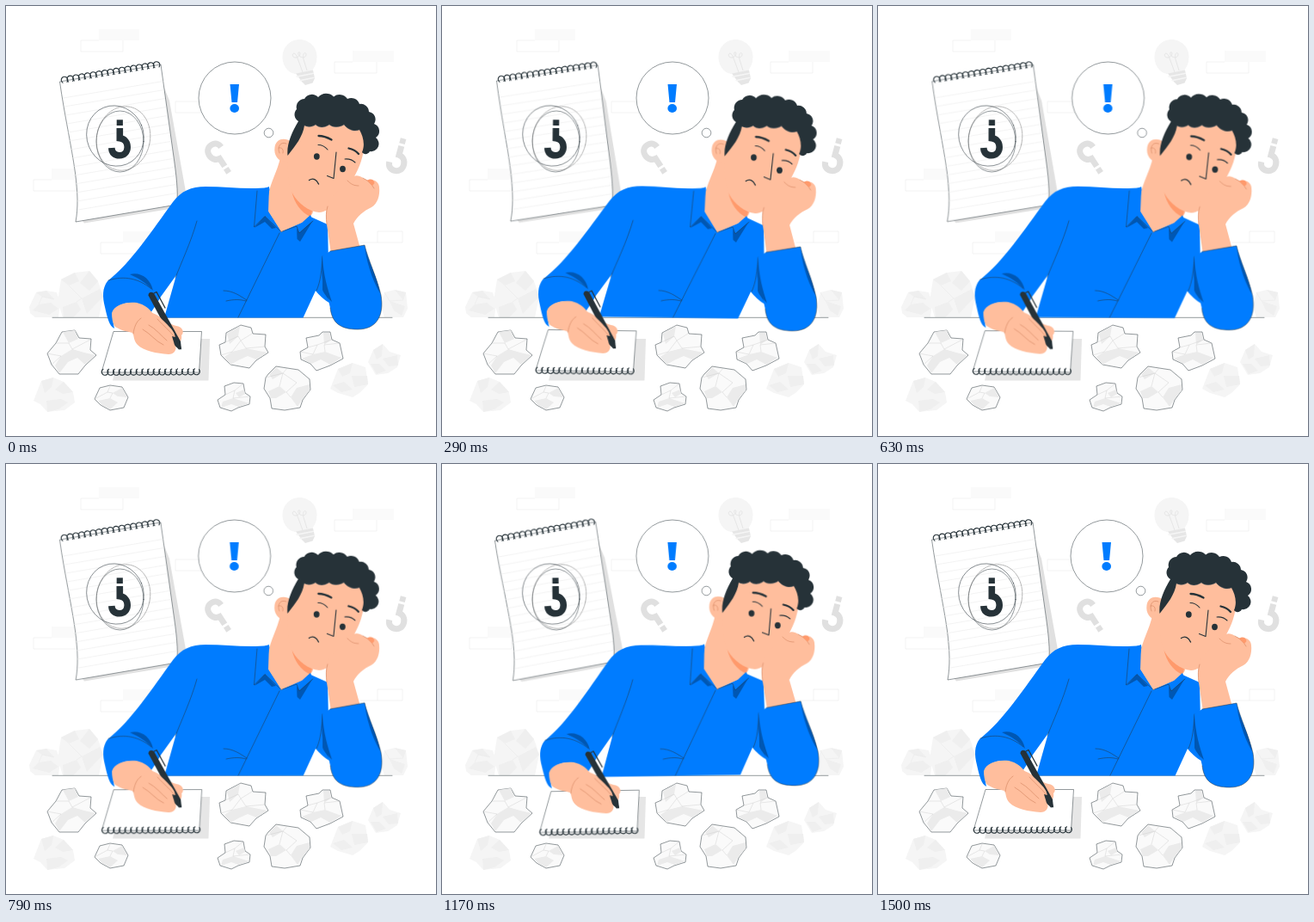
An HTML page that plays this animation: 500 px wide and 500 px high, repeating every 1.54 s.

```html
<!DOCTYPE html>
<html lang="en">
<head>
<meta charset="utf-8">
<title>Thinking writer</title>
<style>
html, body { margin: 0; width: 100%; height: 100%; overflow: hidden; background: #fff; }
svg { display: block; width: 100vw; height: 100vh; }
.sway { animation: wind 1.54s linear infinite; }
#pad { transform-origin: 135px 159px; }
#man { transform-origin: 274.5px 265px; }
#bubble { animation: shake 1.54s ease infinite; }
/* 1.5 s of motion, then a short rest */
@keyframes wind {
  0%, 97.4%, 100% { transform: rotate(0deg); }
  24.35% { transform: rotate(1deg); }
  73.05% { transform: rotate(-1deg); }
}
@keyframes shake {
  0%, 97.4%, 100% { transform: translateX(0); }
  9.74%, 87.66% { transform: translateX(-1px); }
  19.48%, 77.92% { transform: translateX(2px); }
  29.22%, 48.7%, 68.18% { transform: translateX(-4px); }
  38.96%, 58.44% { transform: translateX(4px); }
}
.brick { fill: #fafafa; }
.frame { fill: none; stroke: #ebebeb; stroke-width: .6; }
.pale { fill: #f5f5f5; }
.pale2 { fill: #efefef; }
.grey { fill: #e0e0e0; }
.soft { fill: #e6e6e6; }
.mark { fill: none; stroke: #e0e0e0; }
.paper { fill: #fafafa; stroke: #263238; stroke-width: .5; stroke-linejoin: round; }
.shade { fill: #ebebeb; }
.fold { fill: none; stroke: #c8c8c8; stroke-width: .4; }
.thin { fill: none; stroke: #263238; stroke-width: .5; stroke-linecap: round; }
.page { fill: #fff; stroke: #263238; stroke-width: .5; stroke-linejoin: round; }
.rule { fill: none; stroke: #ebebeb; stroke-width: .6; }
.coil { fill: none; stroke: #263238; stroke-width: 1.1; stroke-linecap: round; }
.skin { fill: #ffbe9d; }
.blush { fill: #ff9a6c; }
.crease { fill: none; stroke: #d98b68; stroke-width: .7; stroke-linecap: round; }
.blue { fill: #007cff; }
.navy { fill: #0057b3; }
.dark { fill: #263238; }
.ink { fill: none; stroke: #263238; stroke-linecap: round; stroke-linejoin: round; }
</style>
</head>
<body>
<svg viewBox="0 0 500 500" preserveAspectRatio="none">
  <defs>
    <g id="query">
      <path d="M132.300 142V153.600C137.600 154.200 141.200 158.400 141.200 164C141.200 170 137.300 173.800 131.800 173.800C126.300 173.800 123 170.600 122.800 165" stroke-width="7.600"/>
      <path d="M132.300 132.300V139" stroke-width="7.200"/>
    </g>
  </defs>

  <!-- wall -->
  <path class="brick" d="M108 27h47v13h-47zM403 52h48v13h-48zM53 189h48v13h-48zM136 262h48v13h-48z"/>
  <path class="frame" d="M108 40H87V53H136V40M403 65H382V78H431V65M197 111H246V124H197zM53 202H32V215H81V202M136 275H110V288H159V275M432 275V262H461V275H412"/>

  <!-- bulb and question marks -->
  <path class="pale" d="M338 79C328 79 321.500 69 321.500 59.500C321.500 47.500 330.500 39 341.500 39C352.500 39 361.500 48 361.500 59C361.500 66 359 71 356 75Z"/>
  <path class="mark" style="stroke:#e6e6e6" d="M345 77L338 58C334 51 331 59 336 60C343 60 343 52 340 54C338 58 347 63 349 57C349 52 344 55 346 62L350 75"/>
  <path class="soft" d="M337 78.500L357 74.500L359 84L356.500 89.500L348 92L344 88Z"/>
  <path class="pale" d="M337 81.500L358 77.500V79L338 83ZM341 86L358.500 82.500V84L342 87.500Z"/>
  <use href="#query" class="mark" transform="translate(248.500 177) rotate(147) scale(.92) translate(-132 -154)"/>
  <use href="#query" class="mark" transform="translate(456.500 174) rotate(15) scale(.93) translate(-132 -154.500)"/>

  <!-- faint paper balls behind the desk -->
  <path class="pale" d="M27 350L35 333L47 331L59 333L63 346L61 362H34L28 357ZM60 343L64 318L80 310L97 308L107 320L113 338L108 362H66ZM436 350L440 333L452 330L465 333L467 352L462 362H440Z"/>
  <path class="pale2" d="M35 333L47 331L56 341L42 338ZM38 347L52 345L61 352L50 359L31 354ZM64 318L80 310L85 320L73 325ZM97 308L107 320L97 331L86 322ZM88 340L109 329L113 338L102 349L94 358ZM66 350L82 344L87 353L78 362H67ZM452 330L465 333L462 342ZM446 343L464 349L460 360L451 354Z"/>
  <path class="fold" style="stroke:#e3e3e3" d="M73 325L88 340L82 344M38 347L42 338L56 341M440 333L446 343L462 342"/>

  <path class="thin" d="M54 362.300H449"/>

  <!-- faint balls on the desk -->
  <path class="pale" d="M32 459L41 436L55 432L67 437L78 449L80 461L68 470L48 472L40 463ZM377 445L386 422L403 415L418 420L421 440L411 450L403 455L386 450ZM421 414L427 400L438 393L446 402L459 406L455 420L444 427L430 429Z"/>
  <path class="pale2" d="M41 436L55 432L53 443L45 450ZM57 446L67 437L78 449L66 451ZM47 459L64 457L72 461L61 469L48 472ZM386 422L403 415L400 427L391 431ZM402 430L420 430L421 440L405 443ZM380 441L393 437L403 446L390 449ZM427 400L438 393L437 407L431 411ZM438 410L455 406L456 418L445 419ZM424 416L434 416L442 424L431 428Z"/>

  <!-- paper balls -->
  <g>
    <path class="paper" d="M65 379L80 377L85 386L99 387L98 400L105 406L92 418L84 428L62 428L53 417L48 404L58 392Z"/>
    <path class="shade" d="M66 379L73 392L84 387L80 377ZM64 407L77 399L91 403L104 406L92 417L83 409L72 414L62 427L57 418Z"/>
    <path class="fold" d="M58 392L73 392L77 399M48 404L64 407M77 399L98 388M53 417L64 407"/>
  </g>
  <g>
    <path class="paper" d="M256 380L273 371L285 374L287 381L302 382L301 396L305 403L291 412L283 421L261 417L250 406L248 394L255 391Z"/>
    <path class="shade" d="M257 381L272 372L270 384L260 393ZM263 402L279 398L304 403L291 411L281 407L270 412L261 417L254 408Z"/>
    <path class="fold" d="M255 391L270 384L273 389L279 398L301 396M250 406L263 402L273 389L286 381"/>
  </g>
  <g>
    <path class="paper" d="M349 386L364 383L368 379L377 379L379 388L388 392L392 410L377 418L361 424L354 416L343 411L342 402L351 397Z"/>
    <path class="shade" d="M369 380L376 380L378 388L370 394ZM357 405L371 402L390 409L377 417L366 411L355 416L344 410Z"/>
    <path class="fold" d="M351 397L362 394L379 388M342 402L357 405L362 394M371 402L370 394L388 392"/>
  </g>
  <g>
    <path class="paper" d="M109 444L121 441L135 443L142 455L137 467L121 470L110 464L103 457Z"/>
    <path class="shade" d="M124 450L135 444L141 455L130 454ZM107 459L121 456L130 461L121 469L112 464Z"/>
    <path class="fold" d="M103 457L118 449L124 450L121 456M118 449L121 442"/>
  </g>
  <g>
    <path class="paper" d="M254 442L265 438L276 439L278 450L284 454L283 463L270 467L262 471L249 467L246 458L255 452Z"/>
    <path class="shade" d="M267 450L277 446L278 451L271 455ZM252 460L264 456L283 462L270 466L262 463L250 467Z"/>
    <path class="fold" d="M255 452L266 447L264 456L284 454M276 439L266 447"/>
  </g>
  <g>
    <path class="paper" d="M305 428L314 419L327 421L340 423L353 434L354 446L345 458L342 467L324 470L309 468L307 456L300 445L302 432Z"/>
    <path class="shade" d="M306 428L314 420L322 427L310 434ZM305 448L318 442L326 449L314 456L308 456ZM338 444L353 440L353 447L344 458L339 466L331 455Z"/>
    <path class="fold" d="M302 432L322 427L338 438L326 449L331 455M327 421L322 427L318 442"/>
  </g>

  <!-- wall pad -->
  <g id="pad" class="sway">
    <path class="grey" d="M182 90L190 110L209 216L208 233L91 252.500L85 245Z"/>
    <path class="page" d="M62.500 88C68 127 76 162 80.500 194C83.500 217 84 235 81 251L198.500 231C200.500 217 198 196 194.500 172L180 68Z"/>
    <path class="rule" id="rules"/>
    <path class="coil" id="topcoil"/>
    <g class="thin">
      <ellipse cx="127" cy="151" rx="33" ry="35.500" transform="rotate(-22 127 151)"/>
      <ellipse cx="132.500" cy="157.500" rx="27.500" ry="35.500"/>
      <ellipse cx="136.500" cy="154" rx="31" ry="37.500" transform="rotate(12 136.500 154)" stroke="#777" stroke-dasharray="5 1"/>
    </g>
    <use href="#query" fill="none" stroke="#263238"/>
  </g>

  <path class="soft" d="M226 387H237L235.500 435.500H124L126 427Z"/>

  <!-- speech bubble -->
  <g id="bubble">
    <circle class="page" cx="266" cy="107" r="42"/>
    <circle class="page" cx="305.500" cy="147.500" r="5.300"/>
    <path class="blue" d="M260.500 91H271L269 112H262.500Z"/>
    <ellipse class="blue" cx="265.700" cy="119" rx="5.300" ry="4.900"/>
  </g>

  <g id="man" class="sway">
    <!-- notebook -->
    <path class="page" d="M125 378.500H227.500L224.500 426H111Z"/>
    <path class="coil" id="deskcoil"/>

    <!-- body and writing arm -->
    <path class="blue" d="M232 210C258 210 280 214 306 211L320 262L354 245L374 254L376 345C370 342 364 336 360 331L345.500 362.500H184L198 313L180 338C176 345 173 350 168 357C160 347 150 343 138 346C126 349 122 358 126 375C120 372 118 363 115 350C112 338 112 328 118 320C145 299 170 261 194 228C204 215 215 210 232 210Z"/>
    <path class="navy" d="M144 312C157 309 168 317 171 331C163 322 155 317 144 312ZM368 291C372 312 376 326 380 343L375 342C368 330 366 312 368 291Z"/>
    <path class="thin" d="M222 250C215 275 203 300 197 316M119 319C138 313 155 317 169 329M318 264L270 362M253 331C264 331 272 337 280 342M256 343C265 341 272 341 279 343M361 331C366 320 367 307 368 291"/>

    <!-- neck and collar -->
    <path class="skin" d="M319 176C316 192 307 205 305 221V239L320 263L345 252L356 242L370 205L335 170Z"/>
    <path class="blush" d="M332.500 216C337 227 347 233 356 238L354 245C343 240 335 229 332.500 216Z"/>
    <path class="blue" d="M306 210L292 215L288.500 257L301 244.500L320 262.500L305 239ZM320 262.500L344 252L354 243L357 250L341 264L339.500 271L337.500 262Z"/>
    <path class="navy" d="M288.500 258L301 244.500L314 258L309 259L301 251ZM338 258L341 264L356.500 250L342 274L338.500 271Z"/>
    <path class="thin" d="M292 215L288.500 257L301 244.500L320 262.500L338 256L341 264L357 250"/>

    <!-- head -->
    <path class="skin" d="M332 158C324 152 314 154 312.500 164C311 174 317 182 327 181C328 195 328 207 333 217C340 230 352 239 364 240C378 239 394 222 404 200C411 188 416 175 417 158C417 139 398 130 374 130C350 130 338 142 332 158Z"/>
    <path class="crease" d="M326 160C319 157 315 164 318 171M317 165C321 164 323 167 322 171"/>
    <path class="dark" d="M327.500 174C326 162 332 147 340 134A9 9 0 0 1 338 120A9.500 9.500 0 0 1 347 108A10 10 0 0 1 363 106A12 12 0 0 1 381 105.500A11 11 0 0 1 397 108A10 10 0 0 1 411 114A9.500 9.500 0 0 1 422 123A9 9 0 0 1 428 137A9 9 0 0 1 430 153A9 9 0 0 1 423 169C421 173 416 173 414 170C418 161 415 151 411 144C404 147 397 143 393 138C387 142 379 141 376 138C370 142 364 142 360 138C356 141 350 141 347 139C345 152 337 162 327.500 174Z"/>
    <path class="ink" style="stroke:#65727a" stroke-width=".4" d="M347 139C356 142 359 139 360 138M376 138C370 142 364 142 360 138M393 138C387 142 379 141 376 138M411 144C404 147 397 143 393 138"/>
    <path class="ink" stroke-width="2.300" d="M363.500 151C369 151 374 153 378.500 155.500M398.500 165.500C403 166.500 407 168.500 410 172"/>
    <ellipse class="dark" cx="361.300" cy="175" rx="3.400" ry="3.700"/>
    <ellipse class="dark" cx="391.500" cy="189.500" rx="3.400" ry="3.700"/>
    <path class="ink" stroke-width="1.100" d="M363 161.500C367 161.500 371 163.500 374 167M394 178C399 177.500 403 179 406 182M384 170L381 200.500L373.500 197.500"/>
    <path class="ink" stroke-width="1.400" d="M352.500 202.500C357 199.500 361 201.500 363.500 207"/>

    <!-- propping arm -->
    <path class="skin" d="M378 288L373 254C371 243 372 229 379 221C387 214 393 210 397 203C402 197 409 195 415 200C419 202 421 203 424 202C430 202 434 206 434 211C435 220 432 230 425 234C416 238 408 245 404 253L412 282Z"/>
    <path class="crease" d="M397 203C401 207 404 209 410 209M415 200C421 203 425 207 428 212M373 254C372 246 372 239 374 233"/>
    <path class="blush" d="M420 203C424 200 428 202 428.500 206L426 209Z"/>
    <path class="blue" d="M377 285L417 278C421 295 431 315 436 336C440 360 431 376 409 376C388 376 379 368 377 351C373 333 367 315 368 291Z"/>
    <path class="navy" d="M368 291C369 313 374 329 379 344C376 341 370 336 368 330ZM417 281C422 299 432 316 435 334C429 324 421 306 417 281Z"/>
    <path class="thin" d="M377 285L417 278C421 295 431 315 436 336C440 360 431 376 409 376C388 376 379 368 377 351"/>

    <!-- writing hand -->
    <path class="skin" d="M123 357C126 347 140 343.500 152 345C161 347 167 352 171 358C182 362 189 370 198 372C205 373 208 379 204 383C205 388 202 393 197 395C199 400 195 405 189 405C175 404 160 401 153 394C148 389 149 382 147 380C139 378 132 377 126 372C124 368 123 363 123 357Z"/>
    <path class="ink" stroke-width="1.300" d="M172 334L175 332.500L185 351"/>
    <path class="dark" d="M165.500 336.500C165.500 332.500 170 331.500 172.500 335L203 390L204 399.500L197.500 396Z"/>
    <path class="skin" d="M160 359C166 355 174 357 179 362C187 370 195 377 196 382C198 387 196 393 194 398L181 394L163 382Z"/>
    <path class="crease" d="M166 371C174 375 181 384 187 389M159 376C168 381 174 390 183 394M176 364C184 373 190 377 195 384M148 381C149 374 151 367 157 363"/>
    <path class="dark" d="M193 384L200.500 386L204 399L201 399.500L196 394Z"/>
  </g>
</svg>
<script>
const $ = id => document.getElementById(id);

// A row of open rings between two points
function coil(id, x0, y0, x1, y1, n, side) {
  let d = '';
  for (let i = 0; i < n; i++) {
    const u = i / (n - 1), x = x0 + (x1 - x0) * u, y = y0 + (y1 - y0) * u;
    d += `M${x - 2} ${y + 3.2 * side}a3.8 3.8 0 1 ${side > 0 ? 1 : 0} 5 ${-.8 * side}`;
  }
  $(id).setAttribute('d', d);
}
coil('topcoil', 68, 86, 175, 68.5, 17, 1);
coil('deskcoil', 115, 425.5, 221.5, 425, 17, -1);

let lines = '';
for (let i = 0; i < 14; i++) {
  const y = 107 + i * 10;
  lines += `M${66.5 + i * 1.35} ${y}L${182.5 + i * 1.25} ${y - 19.5}`;
}
$('rules').setAttribute('d', lines);
</script>
</body>
</html>
```
